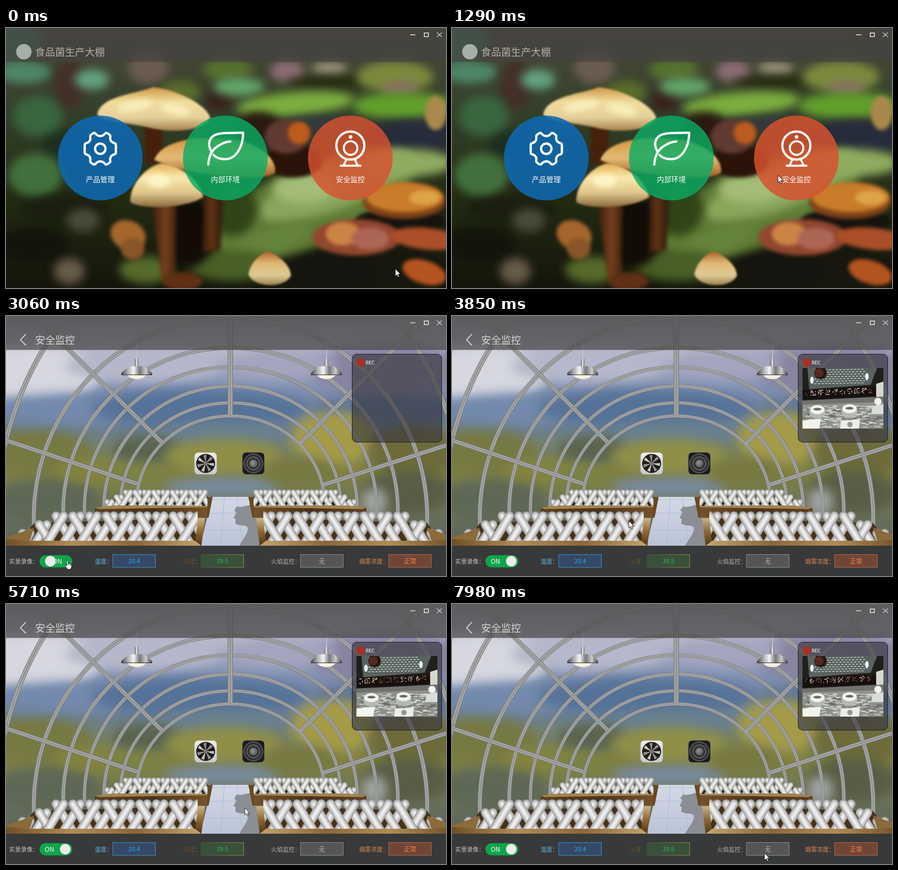
An HTML page with a canvas that plays this animation: 973x575 px, repeating every 8 s.

```html
<!DOCTYPE html>
<html lang="zh-CN">
<head>
<meta charset="utf-8">
<style>
html, body { margin: 0; width: 100%; height: 100%; overflow: hidden; background: #222; }
canvas { display: block; }
</style>
</head>
<body>
<canvas id="stage" width="973" height="575"></canvas>
<script>
const W = 973, H = 575, LOOP = 8000, TAU = Math.PI * 2;
const FONT = '"Noto Sans CJK SC", "Noto Sans CJK", "Noto Sans", sans-serif';
const stage = document.getElementById('stage').getContext('2d');
let c = stage;

function layer(draw) {
  const canvas = document.createElement('canvas');
  canvas.width = W; canvas.height = H;
  c = canvas.getContext('2d');
  draw();
  c = stage;
  return canvas;
}
function blob(color, x, y, rx, ry, turn = 0) {
  c.fillStyle = color;
  c.beginPath(); c.ellipse(x, y, rx, ry, turn, 0, TAU); c.fill();
}
const disc = (color, x, y, r) => blob(color, x, y, r, r);
function poly(color, ...p) {
  c.fillStyle = color;
  c.beginPath();
  for (let i = 0; i < p.length; i += 2) c.lineTo(p[i], p[i + 1]);
  c.fill();
}
function shape(d, fill, stroke, width = 1) {
  const path = new Path2D(d);
  if (fill) { c.fillStyle = fill; c.fill(path); }
  if (stroke) { c.strokeStyle = stroke; c.lineWidth = width; c.stroke(path); }
}
function ring(color, x, y, r, width) {
  c.strokeStyle = color; c.lineWidth = width;
  c.beginPath(); c.arc(x, y, r, 0, TAU); c.stroke();
}
function box(x, y, w, h, r, fill, stroke) {
  c.beginPath(); c.roundRect(x, y, w, h, r);
  c.fillStyle = fill; c.fill();
  if (stroke) { c.strokeStyle = stroke; c.lineWidth = 1; c.stroke(); }
}
function text(s, x, y, size, color, align = 'left', font = FONT) {
  c.font = `${size}px ${font}`;
  c.textAlign = align; c.textBaseline = 'middle';
  c.fillStyle = color; c.fillText(s, x, y);
}
function ramp(x1, y1, x2, y2, ...colors) {
  const g = c.createLinearGradient(x1, y1, x2, y2);
  colors.forEach((k, i) => g.addColorStop(i / (colors.length - 1), k));
  return g;
}
function header(title, color) {
  c.fillStyle = 'rgba(68,66,65,.68)'; c.fillRect(0, 0, W, 75);
  text(title, 64.5, 53, 22, color);
  c.lineCap = 'butt';
  shape('M894 15H905', null, '#d8d4a8', 2);
  shape('M925 11H934V19H925Z', null, '#d5d5cc', 2);
  shape('M953 10L964 20M964 10L953 20', null, '#d0d0cc', 1.6);
}

// ---- home page ----
const home = layer(() => {
  c.fillStyle = ramp(0, 0, 0, H, '#4b4a38', '#33402a', '#222a12', '#14150b');
  c.fillRect(0, 0, W, H);
  // distant foliage
  c.filter = 'blur(10px)';
  blob('#3f7058', 10, 25, 70, 55); blob('#4d8767', 40, 98, 60, 24);
  blob('#433028', 140, 125, 35, 55); blob('#63a27f', 190, 114, 38, 22);
  blob('#39653f', 70, 195, 55, 45); blob('#1b3020', 140, 260, 60, 30);
  blob('#42703c', 65, 325, 60, 48); blob('#1a1e10', 130, 400, 100, 28);
  blob('#4a4a38', 170, 425, 36, 26); blob('#12150b', 60, 480, 80, 40);
  blob('#665a49', 140, 538, 34, 29); blob('#6b5c50', 315, 88, 45, 36);
  blob('#596c2a', 385, 142, 45, 26); blob('#39231b', 470, 160, 30, 25);
  blob('#57722e', 490, 92, 55, 24); blob('#63a569', 515, 130, 56, 20);
  blob('#8c6c74', 622, 95, 38, 24); blob('#9b937b', 715, 89, 40, 14);
  blob('#252a0d', 720, 120, 100, 13); blob('#7b893d', 860, 108, 85, 35);
  blob('#8d6b6c', 872, 134, 42, 15);
  blob('#7bae3e', 640, 168, 130, 26, -.08); blob('#629e2b', 880, 172, 115, 30);
  blob('#2a1a10', 560, 225, 50, 40); blob('#343a3c', 700, 215, 90, 20);
  blob('#272c3b', 900, 242, 110, 40);
  // moss slope over dark soil
  blob('#17170f', 790, 535, 190, 60);
  blob('#5f7c37', 680, 390, 240, 90, -.4); blob('#8aa65b', 730, 350, 180, 50, -.35);
  blob('#a3bc77', 660, 355, 70, 32); blob('#8fab5f', 890, 298, 100, 30);
  blob('#2f4417', 500, 400, 55, 60); blob('#65843b', 570, 480, 110, 26, -.4);
  blob('#485f25', 500, 525, 100, 35); blob('#566a2b', 310, 535, 60, 30);
  blob('#15140f', 720, 540, 100, 40); blob('#110c06', 405, 450, 55, 80);
  // mushrooms on the right
  c.filter = 'blur(4px)';
  blob('#2a1308', 635, 295, 65, 36); blob('#613a32', 620, 240, 48, 38);
  blob('#bd5c1d', 648, 232, 25, 25); blob('#a9884b', 950, 188, 24, 38);
  blob('#17130f', 870, 428, 100, 30);
  blob('#7f4318', 880, 386, 91, 36); blob('#c97c2a', 882, 374, 86, 33);
  blob('#dca448', 925, 375, 34, 16);
  blob('#93472f', 775, 463, 98, 40); blob('#cc8446', 745, 455, 38, 26);
  blob('#ad6656', 805, 466, 42, 24);
  blob('#aa4f27', 930, 466, 80, 24, .1); blob('#b3541f', 925, 540, 50, 26, .3);
  blob('#a4662c', 270, 458, 40, 32, .4); blob('#8a5527', 280, 488, 26, 24);
  // stems and caps
  poly('#45200b', 307, 215, 347, 215, 345, 300, 307, 300);
  poly(ramp(430, 0, 480, 0, '#2f170a', '#5e3315', '#2d160a'), 438, 370, 480, 370, 474, 490, 434, 496);
  poly(ramp(325, 0, 380, 0, '#40200f', '#74401c', '#3d1e0f'), 322, 385, 377, 385, 374, 545, 345, 560);
  blob('#5f3014', 390, 560, 45, 20);
  c.filter = 'blur(2px)';
  shape('M328 292C345 245 430 240 485 245C560 250 600 290 595 320C560 345 400 325 328 292', ramp(0, 245, 0, 330, '#d7963f', '#e2bb77', '#a75f22'));
  shape('M202 190C210 150 290 145 325 131C370 135 440 165 452 198C440 228 370 233 320 221C270 208 205 208 202 190', ramp(0, 130, 0, 232, '#cf9445', '#f1dd9c', '#e5d09a', '#9c7540'));
  shape('M275 378C278 335 320 302 345 299C390 305 425 335 437 373C400 400 300 402 275 385Z', ramp(0, 298, 0, 398, '#e2ac50', '#fae9ad', '#dfc589', '#85653a'));
  shape('M536 545C540 515 570 495 580 494C605 505 630 525 630 548C615 577 548 575 536 545', ramp(0, 494, 0, 572, '#b06028', '#deb874', '#dfcb95', '#967947'));
  c.filter = 'blur(6px)';
  blob('#f8ecb8', 285, 172, 40, 12, -.2); blob('#f8ecb8', 375, 180, 35, 12, .2);
  blob('#fdf4c4', 338, 338, 26, 15);
  c.filter = 'none';
  header('食品菌生产大棚', '#b5aea4');
  disc('#a7b0a8', 39.5, 52.5, 17);
});

function gear(x, y) {
  for (const [sx, sy] of [[1, 1], [-1, 1], [1, -1], [-1, -1]]) {
    c.save(); c.translate(x, y); c.scale(sx, sy);
    shape('M-34.500 0V-8Q-34.500 -11.500 -31 -12.500C-25 -14 -21 -19 -22 -25C-23 -30 -21 -31 -16 -34Q-12 -36 -10 -33Q-6 -28 0 -28', null, '#fff', 5);
    c.restore();
  }
  ring('#fff', x, y, 11.5, 5);
}
const buttons = [
  { x: 208.5, fill: 'rgba(14,104,176,.9)', label: '产品管理', icon() { gear(208.5, 267); } },
  { x: 485, fill: 'rgba(10,172,100,.83)', label: '内部环境', icon() {
    shape('M447.500 302C448 282 456 268 472 259Q483 252 496 251M455 274C446 260 448 247 458 239C469 231 490 232 524.500 231.500C524 266 507 291 483 290Q468 290 459 281', null, '#fff', 5);
  } },
  { x: 761.5, fill: 'rgba(216,82,48,.84)', label: '安全监控', icon() {
    ring('#fff', 761.5, 260, 31, 5);
    ring('#fff', 762, 265.5, 15, 4.5);
    disc('#fff', 762, 241, 4);
    shape('M753 290L747 303M771 290L777 303M740 304.500H784', null, '#fff', 4.5);
  } }
];
function drawHome(mx, my) {
  c.drawImage(home, 0, 0);
  for (const b of buttons) {
    c.globalAlpha = Math.hypot(mx - b.x, my - 287.5) < 94 ? 1 : .97;
    disc(b.fill, b.x, 287.5, 93.7);
    c.globalAlpha = 1;
    c.lineCap = c.lineJoin = 'round';
    b.icon();
    text(b.label, b.x, 335, 16, '#fff', 'center');
  }
}

// ---- monitoring page ----
function pipe(draw, w) {
  for (const [k, color] of [[1, '#77797a'], [.72, '#b5b5b2'], [.4, '#929495']]) {
    c.strokeStyle = color; c.lineWidth = w * k;
    c.beginPath(); draw(); c.stroke();
  }
}
const beam = (x1, y1, x2, y2, w) => pipe(() => { c.moveTo(x1, y1); c.lineTo(x2, y2); }, w);
function hoop(rx, cy, ry, foot, w) {
  const a = Math.asin((foot - cy) / ry);
  pipe(() => c.ellipse(496.5, cy, rx, ry, 0, Math.PI - a, TAU + a), w);
}
function tube(x1, y1, x2, y2, w) {
  c.lineCap = 'round';
  for (const [k, color] of [[1, '#959595'], [.84, '#b9b9b9'], [.55, '#d9d9d9'], [.25, '#eee']]) {
    c.strokeStyle = color; c.lineWidth = w * k;
    c.beginPath(); c.moveTo(x1, y1); c.lineTo(x2, y2); c.stroke();
  }
  c.lineCap = 'butt';
}
function rack(x, step, n, top, low, w, right) {
  c.save();
  c.beginPath(); c.rect(0, 0, right, low - w * .2); c.clip();
  const lean = (low - top) * .62, off = w * .42;
  for (let i = -2; i < n; i++) {
    const px = x + i * step, py = top + Math.max(0, -i) * (low - top) * .32;
    const k = (low - py) / (low - top);
    for (const side of i % 2 ? [1, -1] : [-1, 1])
      tube(px + side * off, py, px + side * (off - lean * k), low, w);
  }
  c.restore();
}
function beds() {
  poly('#38281a', 240, 400, 447, 400, 447, 422, 236, 422);
  rack(270, 20.6, 9, 389.5, 423, 12.5, 447);
  poly(ramp(196, 0, 447, 0, '#5d4020', '#4b321c', '#75522c'), 196, 424, 240, 419, 447, 420, 447, 446, 196, 433);
  poly('#a48450', 196, 424, 240, 419, 447, 420, 447, 423, 205, 427);
  poly('#69491f', 446, 401, 457, 400, 448, 446, 444, 446);
  poly('#463219', 62, 458, 424, 447, 424, 499, 30, 499);
  rack(119, 37, 9, 442, 502, 20, 424);
  poly('#8b6b3b', 62, 468, 0, 490, 0, 500, 52, 498);
  poly(ramp(0, 0, 432, 0, '#6f4f25', '#b08c55', '#8a6838', '#c4a46b'), 0, 493, 50, 497, 421, 497, 432, 508, 0, 508);
  poly(ramp(0, 447, 0, 508, '#cbb384', '#8d6633', '#4f3514'), 424, 447, 440, 447, 432, 508, 419, 498);
}
function lamp(x) {
  c.fillStyle = '#c9c9cc'; c.fillRect(x - .5, 57, 1.5, 40);
  const metal = ramp(x - 34, 0, x + 34, 0, '#444', '#aaa', '#f4f4f4', '#777', '#ccc', '#444');
  blob('#f3f2de', x, 129, 20, 10.5);
  c.fillStyle = ramp(x - 4, 0, x + 4, 0, '#666', '#eee', '#666'); c.fillRect(x - 4, 95, 8, 17);
  poly(metal, x - 17, 111, x + 17, 111, x + 34, 126, x + 34, 131, x - 34, 131, x - 34, 126);
  c.fillStyle = 'rgba(50,50,50,.6)'; c.fillRect(x - 34, 129, 68, 2);
}
function fan(x, y) {
  box(x - 24.5, y - 24, 49, 48, 8, ramp(0, y - 24, 0, y + 24, '#ececec', '#c9c9c9'), '#b8b8b8');
  disc('#211c19', x, y, 21);
  c.save(); c.translate(x, y);
  for (let i = 0; i < 7; i++) {
    c.rotate(TAU / 7);
    poly(i % 2 ? '#c4c4c2' : '#93928f', 0, 0, -5, -18, 2, -19);
  }
  c.restore();
  disc('#777', x, y, 4.5);
}
function vent(x, y) {
  box(x - 24, y - 24, 48, 48, 8, '#1b1b1c', '#444');
  disc('#56575a', x, y, 22); disc('#2a2b2d', x, y, 19.5);
  ring('#515356', x, y, 14, 4); disc('#66686a', x, y, 9); disc('#85878a', x - 1, y - 1, 5);
}
const house = layer(() => {
  c.fillStyle = ramp(0, 0, 0, 510, '#94939f', '#b7b8cb', '#7d8db1', '#6c7f8c', '#81813f', '#6d7459', '#59645e');
  c.fillRect(0, 0, W, H);
  c.filter = 'blur(12px)';
  blob('#d6d7df', 60, 130, 150, 65); blob('#b5b7ca', 300, 110, 170, 38);
  blob('#8784a2', 850, 120, 180, 60); blob('#a5a4bd', 610, 105, 120, 30);
  blob('#7389ad', 150, 205, 190, 34); blob('#557399', 430, 205, 240, 44);
  blob('#5d7596', 850, 210, 180, 35); blob('#69808f', 480, 258, 150, 25);
  blob('#777943', 60, 300, 130, 48); blob('#59644f', 310, 295, 75, 30);
  blob('#8f8f48', 480, 310, 130, 38); blob('#a39b47', 725, 270, 95, 60);
  blob('#6d6b39', 900, 300, 100, 60); blob('#7b8245', 270, 355, 100, 25);
  blob('#788aa0', 480, 378, 130, 22); blob('#5e6856', 90, 410, 120, 50);
  blob('#83833f', 180, 340, 70, 24); blob('#777942', 650, 345, 80, 32);
  blob('#585e45', 885, 390, 100, 50); blob('#a2a5a4', 815, 410, 28, 30);
  c.filter = 'none';
  hoop(520, 470, 655, 480, 11);
  hoop(435, 445, 442, 478, 10); hoop(370, 430, 360, 448, 9);
  hoop(323, 425, 312, 438, 8); hoop(280, 425, 270, 428, 8);
  hoop(244, 420, 228, 408, 7.5); hoop(208, 415, 194, 388, 7.5);
  beam(64, 0, 345, 280, 10); beam(930, 0, 651, 281, 10);
  beam(0, 275, 290, 371, 10); beam(973, 286, 703, 373, 10);
  beam(496, 0, 496, 219, 12);
  lamp(289); lamp(708.5);
  fan(441.5, 326); vent(547, 326);
  // walkway with a cast shadow
  poly(ramp(0, 400, 0, 508, '#d3d8e5', '#bbc4d8'), 456, 400, 538, 400, 575, 508, 430, 508);
  c.strokeStyle = '#aab8d2'; c.lineWidth = 1;
  for (const y of [406, 436, 474]) { c.beginPath(); c.moveTo(438, y); c.lineTo(560, y); c.stroke(); }
  for (const x of [-14, 13]) { c.beginPath(); c.moveTo(497 + x, 400); c.lineTo(500 + x * 1.8, 508); c.stroke(); }
  shape('M542 417C530 420 519 424 511 421L505 429L509 435L503 447L508 449L507 459C515 465 528 462 533 466C540 475 525 490 516 508H575L554 447Z', '#8b8e95');
  beds();
  c.save(); c.translate(993, 0); c.scale(-1, 1); beds(); c.restore();
  c.fillStyle = 'rgba(55,56,57,.96)'; c.fillRect(0, 508, W, 67);
  header('安全监控', '#d6d6d6');
  shape('M44 40L32 52.500L44 65', null, '#dadada', 2);
  box(765.5, 84.500, 198, 194.5, 10, 'rgba(55,54,60,.62)', '#111');
  disc('#ad2e20', 784.5, 103, 9.3);
  text('REC', 795.5, 103.5, 10.5, '#fff', 'left', 'Lato, sans-serif');
});

const rand = n => { const v = Math.sin(n * 127.1) * 43758.5453; return v - Math.floor(v); };
const camera = layer(() => {
  c.beginPath(); c.rect(775, 115, 179, 134); c.clip();
  c.fillStyle = '#201f1c'; c.fillRect(775, 115, 179, 134);
  poly('#59625f', 786, 115, 940, 115, 926, 152, 790, 162);
  c.fillStyle = '#d0dbd6';
  for (let r = 0; r < 7; r++) for (let i = 0; i < 14; i++) c.fillRect(801 + i * 8 + r % 2 * 4, 119 + r * 5 - i * .15, 5, 1.5);
  blob('#e6eff2', 796, 142, 4, 8); blob('#e6eff2', 917.5, 134, 4, 8);
  disc('#271814', 815, 126, 14); disc('#54291f', 812, 126, 10);
  poly('#d6d7cd', 938, 150, 954, 145, 954, 185, 938, 180);
  poly('#70736c', 775, 187, 954, 178, 954, 192, 775, 198);
  poly('#8f928a', 775, 196, 954, 190, 954, 249, 775, 249);
  for (let i = 0; i < 190; i++) {
    c.fillStyle = i % 3 ? '#dfe3da' : '#575b54';
    c.fillRect(775 + rand(i) * 175, 198 + rand(i + 500) * 50, 6 + rand(i + 900) * 8, 1.5);
  }
  for (const [x, y] of [[808, 210], [879, 208]]) {
    blob('#b5b9b5', x, y + 4, 18, 13); blob('#f0f1ec', x, y - 3, 16, 10); blob('#686b66', x, y - 4, 9, 3);
  }
  poly('#d9ddd7', 930, 199, 954, 195, 954, 217, 927, 217); disc('#f4f4ee', 942, 189, 8);
  poly('#f2f4f0', 775, 231, 816, 227, 812, 249, 775, 249);
  poly('#eceeea', 860, 232, 902, 228, 900, 249, 858, 249); disc('#949890', 880, 240, 6);
});
function drawCamera(t) {
  c.drawImage(camera, 0, 0);
  poly('#16100e', 776, 164, 935, 156, 938, 177, 777, 185);
  const shift = Math.floor(t / 78) * 2;
  for (let i = 0; i < 75; i++) {
    const col = i + shift;
    if (col % 8 > 5) continue;
    c.fillStyle = rand(Math.floor(col / 8)) > .4 ? '#e9c9b4' : '#96604a';
    for (let r = 0; r < 5; r++)
      if (rand(col * 7 + r) > .58) c.fillRect(781 + i * 2, 165 - i * .09 + r * 2.5, 2, 1.6);
  }
}
function field(label, x, tone, frame, fill, value, ink) {
  text(label, x, 542, 13, tone);
  const left = label.length > 3 ? x + 65 : x + 40;
  box(left + .5, 527.5, 94, 28.500, 0, fill, frame);
  text(value, left + 47.5, 542, 13.5, ink, 'center');
}
function drawMonitor(t) {
  c.drawImage(house, 0, 0);
  const on = t >= 3060, p = on ? Math.min(1, .23 + (t - 3060) / 300) : 0;
  text('实景录像：', 7, 542, 13, '#c4c4c4');
  box(74, 529, 72.5, 27, 13.5, on ? '#0fa54a' : '#77797b');
  text(on ? 'ON' : 'OFF', 119 - 23 * p, 542.5, 14, '#fff', 'center');
  disc('#eceaea', 88 + 43 * p, 542.3, 11.7);
  const ready = t >= 1980, show = v => ready ? v : '';
  field('温度：', 196, '#62b2de', '#419ed6', '#354967', show('20.4'), '#27a9ef');
  field('湿度：', 391, ramp(391, 0, 425, 0, '#59411f', '#5f4520', '#809447'), ramp(431, 0, 526, 0, '#3b5737', '#6c7d32', '#8fa63d'),
    '#3a503c', show(t < 6000 ? '39.5' : '39.9'), '#23bd55');
  field('火焰监控：', 586, '#b3b3b0', '#9b9b98', '#555553', show('无'), '#b5b5b2');
  field('烟雾浓度：', 781, '#dc8650', '#cf6d42', '#704636', show('正常'), '#ff7e4c');
  if (t >= 3300) drawCamera(t);
}

// ---- pointer: time, x, y ----
const track = [
  [0, 861, 533], [70, 861, 533], [400, 575, 350], [560, 545, 325], [840, 644, 312], [1290, 721, 326],
  [1750, 721, 326], [1850, 715, 300], [2530, 160, 519], [2830, 131, 540], [3130, 131, 540],
  [3850, 391, 453], [4700, 479, 446], [4790, 479, 446], [5540, 528, 451], [5710, 528, 451],
  [6430, 657, 564], [6800, 691, 551], [LOOP, 691, 551]
];
function pointer(t) {
  const i = track.findIndex(k => k[0] > t), a = track[i - 1], b = track[i];
  const p = (t - a[0]) / (b[0] - a[0]), e = p * p * (3 - 2 * p);
  return [a[1] + (b[1] - a[1]) * e, a[2] + (b[2] - a[2]) * e];
}
function drawPointer(x, y, hand) {
  c.save(); c.translate(Math.round(x), Math.round(y));
  c.lineJoin = 'round';
  shape(hand
    ? 'M3 2Q5 -1 6 2V8Q8 6 9 8Q11 7 12 9Q14 8 14 11V15L12 20H5L0 13Q-1 10 3 12Z'
    : 'M0 0V16L3.700 12.500L6.200 18L8.600 17L6.200 11.600H11Z', '#fff', '#111', 1);
  if (hand) shape('M6 8V11M9 8V11M12 9V12', null, '#222', 1);
  c.restore();
}

function frame(now) {
  const t = now % LOOP, [x, y] = pointer(t);
  if (t < 1520) drawHome(x, y); else drawMonitor(t);
  drawPointer(x, y, t > 2680 && t < 3200);
  requestAnimationFrame(frame);
}
requestAnimationFrame(frame);
</script>
</body>
</html>
```
